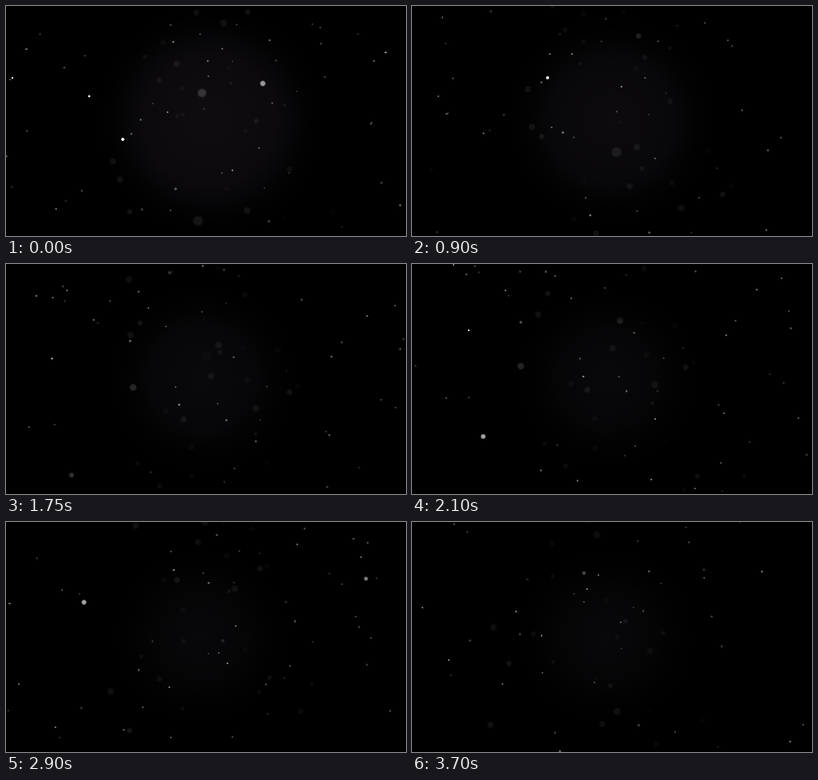
Recreate the animation shown at these times as an HTML page with a canvas. Size 500 by 288 pixels, loop 3750 ms.

```html
<!DOCTYPE html>
<html lang="en">
<head>
<meta charset="utf-8">
<title>Drifting dust</title>
<style>
html, body { margin: 0; width: 100%; height: 100%; overflow: hidden; background: #000; }
canvas { display: block; }
</style>
</head>
<body>
<canvas id="stage" width="500" height="288"></canvas>
<script>
const W = 500, H = 288, LOOP = 3750, STEP = 50, FADE = 500;
const ctx = document.getElementById('stage').getContext('2d');

let seed = 71;
const rand = () => (seed = seed * 16807 % 2147483647) / 2147483647;
const between = (a, b) => a + (b - a) * rand();
const mix = (a, b, u) => a + (b - a) * u;

// Small sharp specks fill the stage; soft motes stay near the middle.
const specks = Array.from({ length: 64 }, () => ({
  x: between(-120, 580), y: between(0, H), speed: between(.07, .12),
  r: between(.8, 1.3), light: between(.15, .5)
}));
const motes = Array.from({ length: 26 }, () => ({
  x: between(120, 380), y: between(0, H), speed: between(.07, .11),
  r: between(2, 5), light: between(.02, .08)
}));

// The most visible grains: radius, light, and a few points on the way.
const grains = [
  { r: 3.6, light: .6, path: [[0, 321, 97], [500, 300, 64]] },
  { r: 2, light: 1, path: [[0, 146, 167], [500, 153, 127], [1350, 188, 48]] },
  { r: 1.4, light: 1, path: [[0, 104, 113], [500, 101, 54]] },
  { r: 1, light: .9, path: [[0, 8, 90], [500, 27, 66]] },
  { r: 6, light: .17, path: [[0, 245, 109], [500, 227, 38]] },
  { r: 7, light: .08, path: [[0, 240, 269], [500, 258, 215], [1350, 253, 147]] },
  { r: 1.6, light: .35, path: [[0, 212, 229], [1350, 177, 123], [2100, 136, 73]] },
  { r: 4.7, light: .14, path: [[1350, 185, 185], [2100, 136, 128], [2600, 166, 30]] },
  { r: 1, light: .8, path: [[1350, 42, 159], [2100, 71, 83], [2600, 54, 16]] },
  { r: 3.2, light: .65, path: [[2100, 89, 216], [2600, 99, 147], [3200, 96, 54]] },
  { r: 2.6, light: .5, path: [[2600, 481, 112], [3200, 419, 30]] },
  { r: 2.2, light: .28, path: [[3200, 250, 117], [3700, 215, 64]] }
];

function disc(x, y, r, alpha) {
  const edge = r + .4;
  const g = ctx.createRadialGradient(x, y, 0, x, y, edge);
  g.addColorStop(0, '#fbf9fa');
  g.addColorStop(.6, '#fbf9fa');
  g.addColorStop(1, 'rgba(251,249,250,0)');
  ctx.globalAlpha = alpha;
  ctx.fillStyle = g;
  ctx.fillRect(x - edge, y - edge, edge * 2, edge * 2);
}

function glow(t) {
  const dim = Math.min(1, t / 2300);
  const x = mix(255, 243, dim), r = mix(138, 104, dim);
  const g = ctx.createRadialGradient(x, 143, 0, x, 143, r);
  g.addColorStop(0, `rgba(20,17,22,${mix(.76, .42, dim)})`);
  g.addColorStop(.6, `rgba(18,15,20,${mix(.62, .28, dim)})`);
  g.addColorStop(1, 'rgba(14,11,15,0)');
  ctx.globalAlpha = 1;
  ctx.fillStyle = g;
  ctx.fillRect(x - r, 143 - r, r * 2, r * 2);
}

// Everything rises and narrows; near the end the current turns left.
function drift({ x, y, speed, r, light }, t) {
  const room = H + 20;
  const py = ((y - speed * t) % room + room) % room - 10;
  const side = .05 * Math.max(0, t - 2900);
  const px = 190 + (x - 190) * Math.exp(.0025 * (py - H / 2)) - side;
  disc(px, py, r, light);
}

function travel({ r, light, path }, t) {
  const last = path.length - 1;
  const away = Math.max(0, path[0][0] - t, t - path[last][0]);
  if (away >= FADE) return;
  let i = 0;
  while (i < last - 1 && t > path[i + 1][0]) i++;
  const [t0, x0, y0] = path[i], [t1, x1, y1] = path[i + 1];
  const u = (t - t0) / (t1 - t0);
  disc(mix(x0, x1, u), mix(y0, y1, u), r, light * (1 - away / FADE));
}

function draw(t) {
  ctx.globalAlpha = 1;
  ctx.fillStyle = '#000';
  ctx.fillRect(0, 0, W, H);
  glow(t);
  motes.forEach(m => drift(m, t));
  specks.forEach(s => drift(s, t));
  grains.forEach(g => travel(g, t));
}

const start = performance.now();
function tick() {
  const t = (performance.now() - start) % LOOP;
  draw(Math.floor(t / STEP) * STEP);
  requestAnimationFrame(tick);
}
tick();
</script>
</body>
</html>
```
